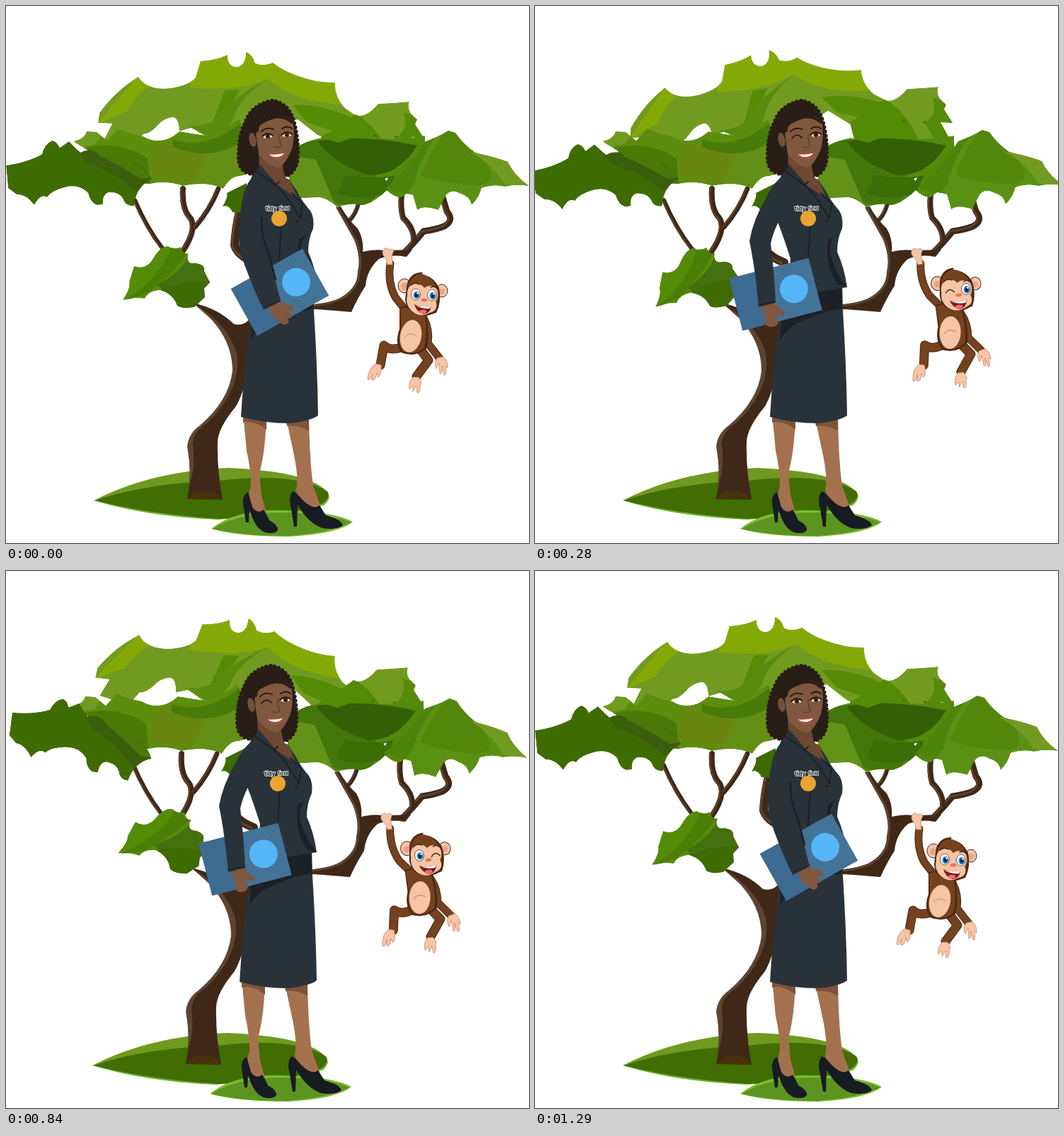
Write an HTML page that moves like this. It is 739 px wide and 758 px high and loops after 1400 ms.

```html
<!DOCTYPE html>
<html lang="en">
<head>
<meta charset="utf-8">
<style>
html, body { margin: 0; height: 100%; overflow: hidden; background: #fff; }
svg { display: block; width: 100%; height: 100%; }
</style>
</head>
<body>
<svg id="stage" viewBox="0 0 739 758"></svg>
<script>
const STEP = 280;
const ORDER = [0, 1, 2, 3, 0];
const DARK = '#2a3239', SHADE = '#1b2127', SKIN = '#80573f', LEG = '#a4714f', LEG_SHADE = '#7d543a';
const FUR = '#75421f', FUR_EDGE = '#4b2814', PINK = '#f6c5a6', PINK_EDGE = '#c98a6b';
const BARK = '#3f2818', BARK_LIGHT = '#5d4431';

const fill = (color, d) => `<path fill="${color}" d="${d}"/>`;
const line = (color, width, d) =>
  `<path fill="none" stroke="${color}" stroke-width="${width}" stroke-linecap="round" stroke-linejoin="round" d="${d}"/>`;
const oval = (color, x, y, rx, ry = rx, extra = '') =>
  `<ellipse fill="${color}" cx="${x}" cy="${y}" rx="${rx}" ry="${ry}" ${extra}/>`;
const group = (transform, body) => `<g transform="${transform}">${body}</g>`;
const turn = (angle, x, y, dx = 0, dy = 0) => `translate(${dx} ${dy}) rotate(${angle} ${x} ${y})`;

// A leaf mass: an outline whose coloured facets are clipped to it.
const leaf = (id, transform, outline, base, facets) => group(transform,
  `<clipPath id="${id}"><path d="${outline}"/></clipPath><g clip-path="url(#${id})">` +
  fill(base, outline) + facets.map(f => fill(...f)).join('') + '</g>');

const branch = (width, d) => line(BARK, width, d) +
  group(`translate(${-width * .32} 0)`, line(BARK_LIGHT, width * .28, d));

const ground = () =>
  fill('#6f9a1f', 'M124 698Q205 656 315 652Q425 657 452 684Q462 693 450 704Q330 745 124 698Z') +
  fill('#67b52a', 'M124 698Q200 721 300 725Q410 718 450 704L457 694Q290 730 124 698Z') +
  fill('#416d02', 'M126 698Q195 674 300 670Q410 657 454 685Q459 693 448 702Q400 721 300 724Q200 717 126 698Z') +
  fill('#79bd2d', 'M290 738Q325 709 395 712Q465 714 490 728Q470 745 400 749Q330 749 290 738Z') +
  fill('#5d9420', 'M292 738Q330 714 400 715Q465 718 488 729Q460 743 400 748Q330 748 292 738Z');

const tree = () =>
  branch(6, 'M182 274Q198 312 221 342Q238 358 256 364') +
  branch(8, 'M250 258Q248 287 261 300Q270 316 249 347') +
  branch(7, 'M300 258Q288 288 267 312') +
  branch(12, 'M331 285Q324 315 323 338Q328 353 352 362L358 440') +
  branch(6, 'M485 303Q494 294 498 279') +
  branch(9, 'M562 349Q578 333 590 318Q606 316 619 311Q634 303 623 290L617 270') +
  branch(8, 'M576 334Q578 315 561 299Q557 285 559 266') +
  fill(BARK, 'M425 422L437 421Q465 418 477 409Q497 396 497 375Q502 355 492 330Q482 312 466 284L473 283Q482 300 497 314Q506 330 504 347Q520 343 535 345L574 344L566 354Q545 350 527 357Q510 372 508 395Q497 412 488 432Q465 430 437 428L425 430Z') +
  line(BARK_LIGHT, 3, 'M430 423Q465 420 479 410Q499 396 499 375Q504 355 494 330Q484 312 469 285') +
  fill(BARK, 'M264 419Q300 427 322 449Q340 453 348 435L348 470Q342 535 325 565Q300 595 299 615Q298 655 306 696H256Q263 660 257 623Q259 604 275 592Q316 557 321 515Q321 475 290 442Q278 430 264 419Z') +
  fill(BARK_LIGHT, 'M264 419Q314 449 326 490Q334 540 285 588Q263 602 264 620Q268 648 261 670L257 690Q263 660 256 622Q258 603 274 592Q315 557 320 515Q320 475 290 442Z') +
  fill('#47320c', 'M256 696Q270 680 279 686Q294 680 306 697Z');

function foliage(p) {
  const crown = turn([0, -6.8, -10.6, 4.5][p], 313, 135);
  const west = turn([0, -2.3, -8, 13][p], 68, 190, [0, -5, -12, 17][p], [0, 5, 13, -9][p]);
  const low = turn([0, -7, -11, 11][p], 250, 380);
  const peak = `translate(0 ${[0, -21, -32, 1][p]})`;
  const east = turn([0, 0, -1, 3][p], 590, 250, [0, 7, 10, 0][p], [0, -1, -8, 2][p]);
  return fill('#3d6b02', 'M306 283Q314 270 312 264L340 250V292L320 291Q315 280 306 283Z') +
    leaf('crown', crown,
      'M130 165L132 151Q155 119 187 100Q198 119 232 116Q259 112 268 101L275 78Q296 77 313 69C311 91 340 94 339 65Q348 68 352 81Q366 86 377 80Q389 90 410 98Q440 109 465 108Q464 129 479 144L495 155L488 205L440 182L412 160L350 190L300 195L262 172L245 177Q244 157 235 157Q222 159 214 169Q203 181 194 181L180 200L138 190L150 166Z',
      '#719b20', [
        ['#84a906', 'M125 170L190 95L205 113Q189 119 170 149Q151 156 125 170Z'],
        ['#84a906', 'M260 110L275 60H355L475 102V139Q405 135 370 103Q331 121 260 115Z'],
        ['#578b06', 'M309 119L331 118Q317 136 315 160L290 169Z'],
        ['#5b8c10', 'M370 103Q330 128 320 161L300 190L256 169Q282 171 299 158Q314 132 370 103Z'],
        ['#578b06', 'M405 140Q440 137 488 157L486 185L425 164Z']]) +
    leaf('mid', '',
      'M95 191Q111 188 114 177L128 178L143 190L158 173Q178 181 194 184Q220 199 245 177L290 184L330 160L350 235L330 240Q317 240 307 258Q285 247 250 254Q226 246 204 251L180 250L105 222L118 205Z',
      '#5d8d0d', [
        ['#719b20', 'M95 170H143L127 195L100 200Z'],
        ['#4c7a07', 'M105 202Q160 188 200 215L204 260L100 235Z'],
        ['#6a8612', 'M216 192Q255 205 287 201L265 248L203 238Z'],
        ['#648f16', 'M287 201L340 184V260L265 248Z'],
        ['#497b09', 'M236 188Q285 205 335 162V190Q290 221 236 199Z']]) +
    leaf('peak', peak,
      'M445 185Q474 168 493 153Q507 160 526 138Q548 137 570 135Q565 149 581 160L578 167L590 186L573 185L591 218L535 236L455 226Z',
      '#719b20', [
        ['#558a04', 'M430 185L493 152Q518 165 534 194L560 240H440Z'],
        ['#568a09', 'M551 186Q570 173 562 150L578 155L594 188V220H570Z'],
        ['#426f05', 'M518 183l4-3l1 5zM548 184l5-1l-2 4z']]) +
    leaf('grove', '',
      'M400 205Q424 190 446 186L470 193L492 185Q548 191 592 183L595 244L559 270Q547 270 538 260Q518 280 502 281Q489 277 468 284Q451 268 438 270L400 272Z',
      '#55890c', [
        ['#447609', 'M395 190L445 190Q493 220 534 247L510 290L435 270Z'],
        ['#345f06', 'M440 190Q510 181 581 197Q555 239 514 239Q463 224 440 190Z'],
        ['#3c6d06', 'M480 238Q510 246 550 239L538 265Q502 276 468 265Z'],
        ['#649218', 'M400 210L438 217L464 278L400 280Z'],
        ['#fff', 'M535 244l5-2l-2 5z']]) +
    leaf('east', east,
      'M536 258Q570 228 591 192Q605 187 625 176L635 179Q646 195 663 207Q691 213 709 220Q718 239 739 254Q722 251 705 255Q688 251 672 257Q669 270 658 281Q655 268 642 265Q629 257 621 268L611 288Q590 281 581 288L575 267Z',
      '#5a9114', [
        ['#4e830c', 'M530 260L592 188L611 180Q585 212 577 250L560 275Z'],
        ['#54860c', 'M627 170L664 204Q702 245 670 253Q609 250 587 239Q601 199 627 170Z'],
        ['#719b20', 'M655 206L710 217L744 257L704 251Q688 223 655 206Z']]) +
    leaf('west', west,
      'M0 225Q32 220 51 209Q54 195 65 190Q72 191 76 200L89 191L105 207Q118 199 132 209Q157 219 180 220Q198 229 206 244Q184 254 181 282Q171 283 167 276Q162 262 145 263Q136 266 137 280L129 281Q119 278 116 264Q103 251 83 256Q64 261 58 270Q49 264 40 281Q28 265 15 266L3 257Z',
      '#3f6c02', [
        ['#3b5e0d', 'M100 204L125 200L210 244L184 262Q151 232 115 222Z'],
        ['#4c7809', 'M135 190L210 242L190 244Q160 224 130 210Z']]) +
    leaf('low', low,
      'M165 415Q176 398 174 389L181 367Q199 373 208 356Q218 339 229 339Q237 345 247 340Q250 351 258 349Q253 365 268 363Q282 365 280 374L288 390L280 399L281 411L266 425Q249 428 242 423Q236 406 218 401Q201 402 196 413L184 412Z',
      '#568b08', [
        ['#447010', 'M213 394Q241 380 257 356L290 365V392Q257 392 236 410Z'],
        ['#3e6b02', 'M218 400Q253 387 292 388V430H240Z'],
        ['#4c7d05', 'M165 417Q220 383 234 338L255 350Q236 379 200 405Z']]);
}

function womanEye(x, y, open) {
  return open
    ? fill('#f4ece4', `M${x - 7} ${y + 1}Q${x} ${y - 6} ${x + 7} ${y}Q${x} ${y + 6} ${x - 7} ${y + 1}Z`) +
      oval('#5b3a1a', x, y, 3.4) + oval('#140d0a', x, y, 1.7) +
      line('#1c120d', 1.7, `M${x - 8} ${y}Q${x} ${y - 7} ${x + 7} ${y - 1}`)
    : line('#24150f', 1.5, `M${x - 7} ${y + 3}Q${x} ${y - 6} ${x + 7} ${y + 2}`);
}

function head(p) {
  const hair = 'M376 134Q348 139 339 163Q329 183 329 210Q328 232 343 236Q365 242 395 240Q411 234 412 213Q413 188 407 165Q400 137 376 134Z';
  return fill('#281d17', hair) +
    `<path d="${hair}" fill="none" stroke="#281d17" stroke-width="6" stroke-dasharray="0 6" stroke-linecap="round"/>` +
    fill('#6d4833', 'M357 202L358 232L385 262L413 275L402 246L394 242L390 220Z') +
    fill(SKIN, 'M354 187Q351 171 365 163Q388 147 405 162Q409 184 404 202Q396 222 386 228Q372 228 357 209Z') +
    line('#281d17', 4, 'M355 176Q354 166 366 162Q389 150 404 164') +
    oval('#74503a', 348.5, 189, 5, 10, 'transform="rotate(-12 348 189)"') +
    womanEye(370, 184, p === 0) + womanEye(397, 182, p !== 2) +
    line('#21140e', 1.8, 'M361 177Q368 170 378 174M390 173Q398 168 404 173') +
    line('#5f3e2c', 1.4, 'M386 181Q386 191 389 197Q387 201 379 199') +
    fill('#a5503f', 'M369 208Q376 209 382 207Q389 208 396 206Q391 218 382 217Q374 216 369 208Z') +
    fill('#fff', 'M372 209.5Q383 210.5 393 208Q389 213 382 213Q376 213 372 209.5Z');
}

const shoes = () =>
  fill('#171b22', 'M342 686Q334 690 335 702L339 729H343L344 711Q352 738 366 743Q380 746 384 740Q385 733 372 726Q367 715 364 711Q355 718 348 707Z') +
  fill('#171b22', 'M405 685Q398 695 403 710L407 735H411L412 704Q427 730 447 737Q468 740 476 733Q474 725 452 719L443 705Q432 714 411 688Z');

const legs = () =>
  fill(LEG, 'M335 575H368Q367 628 358 659L361 690L368 716Q355 721 345 704Q341 692 346 677Q346 654 340 628Z') +
  fill(LEG, 'M395 578H428Q429 642 434 677L447 713Q434 720 411 691L410 681Q414 669 407 634Z') +
  fill(LEG_SHADE, 'M335 578H368V598Q350 584 335 588ZM395 580H428V600Q415 591 397 593Z') +
  shoes();

const torso = () =>
  fill(DARK, 'M351 390H434L435 430Q440 510 441 578Q430 586 400 589Q365 589 332 580Q336 510 345 450Z') +
  fill(SHADE, 'M346 472Q349 430 352 390H434V427Q406 431 385 442Q359 450 346 472Z') +
  fill(DARK, 'M359 224L347 241L340 270L343 305Q352 328 361 357L357 403H404L441 397Q437 369 427 347Q427 328 434 314Q436 299 430 289Q417 274 411 261L402 248L412 272L384 253Z') +
  fill(SHADE, 'M427 322Q414 331 418 353Q425 378 441 397L427 393Q409 365 414 330Z') +
  line(SHADE, 2, 'M353 233L381 253L386 248M381 253Q398 267 415 299M404 264L419 279L416 300M389 310Q387 337 386 359') +
  oval(SHADE, 412, 304, 2) +
  `<g font-family="Inter, sans-serif" font-weight="800" fill="#20252a" stroke="#fff" stroke-width="1.5" paint-order="stroke">
    <text x="367" y="289" font-size="8">tidy</text><text x="386" y="288" font-size="6.5">field</text></g>` +
  oval('#e9a52f', 386, 300, 11);

function armAndFolder(p) {
  const k = [0, 1, 2, 1][p];
  const [x, y, angle] = [[387, 404, -29.4], [340, 407, -14.5], [324, 408.5, -8]][k];
  const sleeve = [
    'M354 236Q337 250 334 275Q327 307 330 345Q345 390 364 429L388 417Q380 385 372 352Q360 325 362 300L366 255Z',
    'M354 236Q334 252 326 272Q308 302 303 332Q311 370 316 425L340 419Q338 375 333 335Q337 318 345 303L366 265Z',
    'M354 236Q332 250 322 270Q303 300 295 330Q300 375 298 422L322 420Q321 375 325 335Q330 318 343 303L366 265Z'][k];
  const hand = [
    'M369 424L387 417L404 423Q411 429 405 432L394 428L405 437Q403 442 396 440Q404 446 394 450Q382 446 377 438Z',
    'M320 422L338 419L353 433Q355 439 349 438L340 434L344 446Q343 453 334 453Q324 453 326 443Z',
    'M302 420L320 419L334 435Q335 440 329 439L323 435L325 448Q321 455 308 451Q302 447 304 439Z'][k];
  const folder = '<path fill="#447398" d="M-58-38H58V38H-58Z"/><path fill="#3e6b91" d="M-58-38H0L-6 38H-58Z"/>' +
    oval('#55b5f7', 27, -1, 20);
  return group(`translate(${x} ${y}) rotate(${angle})`, folder) +
    fill(SKIN, hand) + fill(DARK, sleeve) +
    (k ? '' : line(SHADE, 2.5, 'M361 299Q360 325 372 352L381 386')) +
    line(SHADE, 1.3, ['M366 425L387 415', 'M317 422L339 417', 'M299 419L321 417'][k]);
}

const limb = (d, w) => line(FUR_EDGE, w, d) + line(FUR, w - 2, d);
const paw = d => `<path fill="${PINK}" stroke="${PINK_EDGE}" stroke-width=".8" stroke-linejoin="round" d="${d}"/>`;

const monkeyEye = (x, y, open) => open
  ? oval('#fff', x, y, 6.5, 8, 'stroke="#5b321d" stroke-width=".8"') + oval('#2784cf', x + 1, y + 1, 4.4, 5.2) +
    oval('#10202e', x + 1, y + 1, 2.3, 3) + oval('#fff', x + 2.5, y - 1.5, 1.3)
  : line('#4b2814', 1.5, `M${x - 6} ${y + 3}Q${x} ${y - 5} ${x + 6} ${y + 3}`);

function monkey(p) {
  const ear = (x, y, r) => oval(PINK, x, y, r, r + 1, `stroke="${FUR_EDGE}" stroke-width="1"`) + oval('#e8a487', x, y + 1, r - 4);
  const body =
    limb('M561 481Q543 488 534 479L529 507', 13) +
    limb('M585 484L597 500L580 523', 13) +
    limb('M590 440Q599 457 596 476L614 499', 11) +
    limb('M543 364Q539 390 550 411Q559 423 570 435', 11) +
    fill(FUR_EDGE, 'M556 425Q582 419 594 435Q599 464 594 484Q578 497 558 489Q549 475 556 456Z') +
    fill(FUR, 'M557 427Q581 421 592 437Q596 464 591 483Q577 494 560 487Q552 475 558 456Z') +
    oval(PINK, 572, 466, 15, 23, 'transform="rotate(10 572 466)"') +
    line(PINK_EDGE, 1, 'M563 467Q571 459 580 466') +
    paw('M523 505Q512 510 511 527Q515 530 518 519L517 528Q522 530 524 518L526 524Q531 521 530 507Z') +
    paw('M575 524Q568 532 570 541L575 536L575 544L580 536L581 546Q586 546 585 536Q589 531 583 524Z') +
    paw('M609 497Q604 505 608 512L612 504L613 519Q617 520 616 508L619 521Q623 522 621 508L624 511Q625 501 618 495Z') +
    paw('M539 365Q538 357 534 353Q530 348 534 343Q538 340 541 344Q546 341 548 346Q544 350 546 365Z') +
    ear(563, 395, 9) + ear(616, 402, 8) +
    fill(FUR_EDGE, 'M567 391Q573 375 589 376L587 379Q604 381 612 398Q616 417 608 433L596 437Q565 438 564 413Z') +
    fill(FUR, 'M569 392Q575 379 587 378Q601 381 609 398Q613 415 606 431Q594 436 580 431Q567 422 567 410Z') +
    fill(PINK, 'M567 409Q566 395 577 392Q587 391 591 398Q600 391 609 400Q613 409 607 417Q612 429 599 433Q582 442 570 427Q564 417 567 409Z') +
    monkeyEye(579, 407, p === 0 || p === 3) + monkeyEye(602, 408, p < 2) +
    line(FUR_EDGE, 1.5, 'M572 394Q578 389 584 393M600 397Q606 394 610 399') +
    oval('#e9765f', 591, 415, 4.5, 2.5) +
    fill('#7b1c1b', 'M577 421Q587 426 601 423Q600 434 590 435Q580 432 577 421Z') +
    fill('#fff', 'M578 422Q588 426 601 423L599 427Q587 428 578 422Z') +
    oval('#ec6e68', 589, 431.5, 5.5, 2.8);
  return group(turn([0, -7.4, -13, -7.4][p], 540, 350), body);
}

const scene = p => group(`translate(${p > 1 ? -2 : 0} 0)`,
  ground() + tree() + foliage(p) + monkey(p) + legs() + head(p) + torso() + armAndFolder(p));

const scenes = [0, 1, 2, 3].map(scene);
const stage = document.getElementById('stage');
let shown = -1;

function draw() {
  const pose = ORDER[Math.floor(performance.now() / STEP) % ORDER.length];
  if (pose !== shown) stage.innerHTML = scenes[shown = pose];
  requestAnimationFrame(draw);
}
draw();
</script>
</body>
</html>
```
